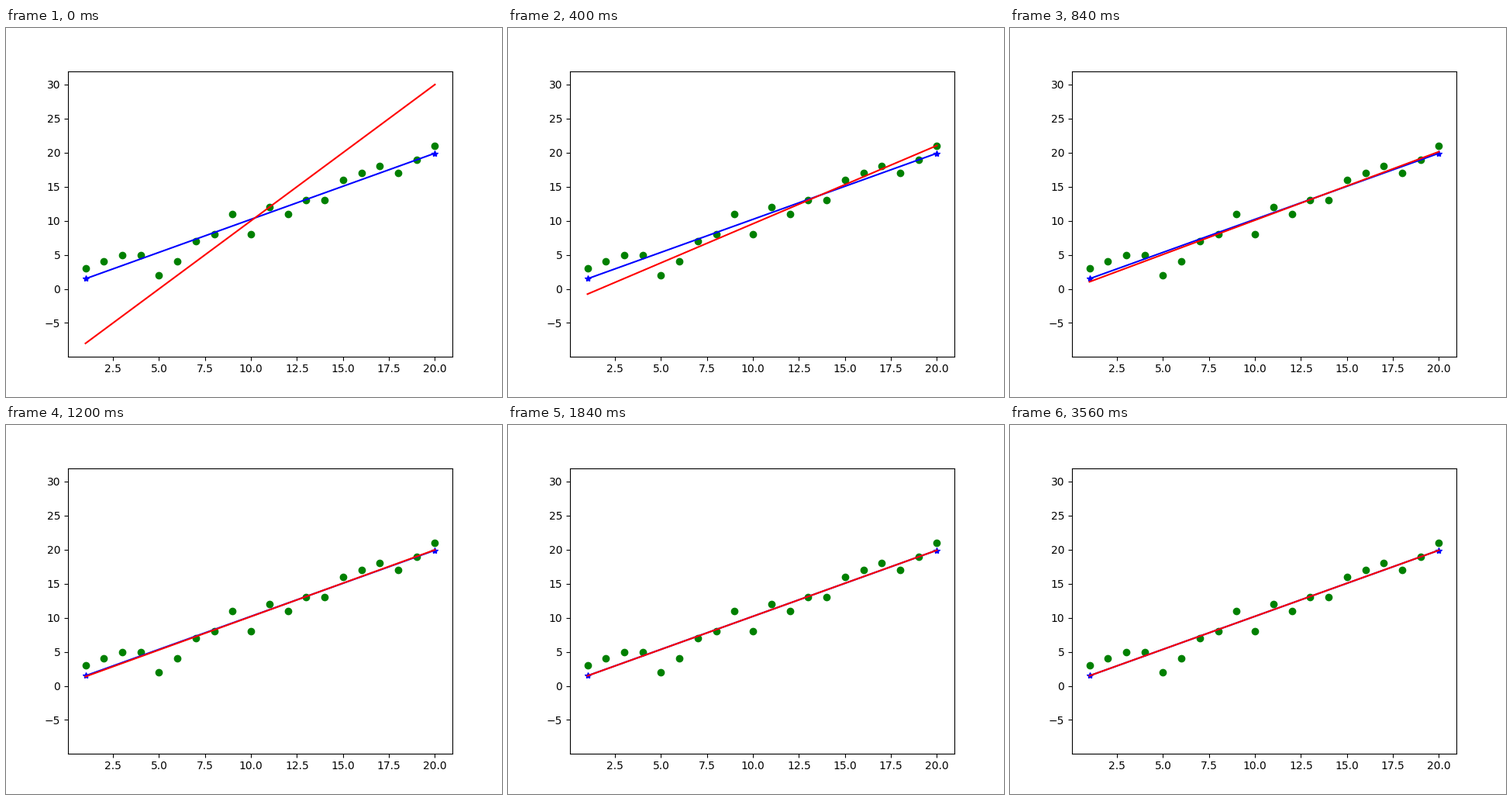
These frames come from a looping animation (640x476 px, 4000 ms). A matplotlib script:

```python
import numpy as np
import matplotlib.pyplot as plt
from matplotlib.animation import FuncAnimation

W, H, DPI = 640, 476, 100
FRAMES, INTERVAL = 100, 40
FLOW = 0.6365  # gradient-flow time per frame

# Data points and their least-squares line
x = np.arange(1, 21)
y = np.array([3, 4, 5, 5, 2, 4, 7, 8, 11, 8,
              12, 11, 13, 13, 16, 17, 18, 17, 19, 21])
A = np.column_stack([np.ones(x.size), x])
best = np.linalg.lstsq(A, y, rcond=None)[0]
ends = np.array([1, 20])

# Gradient descent on the mean squared error, solved per eigenmode
start = np.array([-10.0, 2.0])
rates, modes = np.linalg.eigh(A.T @ A / x.size)
offset = modes.T @ (start - best)


def params(k):
    return best + modes @ (np.exp(-FLOW * rates * k) * offset)


def line_y(p):
    return p[0] + p[1] * ends


plt.rcParams["font.family"] = "DejaVu Sans"
fig = plt.figure(figsize=(W / DPI, H / DPI), dpi=DPI)
ax = fig.add_axes([0.125, 52.47 / H, 0.775, 367.29 / H])
ax.plot(x, y, "go")
ax.plot(ends, line_y(best), "b-")
ax.plot(ends, line_y(best), "b*")
fit, = ax.plot(ends, line_y(start), "r-")
ax.set_xlim(0.05, 20.95)
ax.set_ylim(-9.9, 31.9)


def update(k):
    fit.set_ydata(line_y(params(k)))
    return fit,


anim = FuncAnimation(fig, update, frames=FRAMES, interval=INTERVAL, repeat=True)
plt.show()
```
